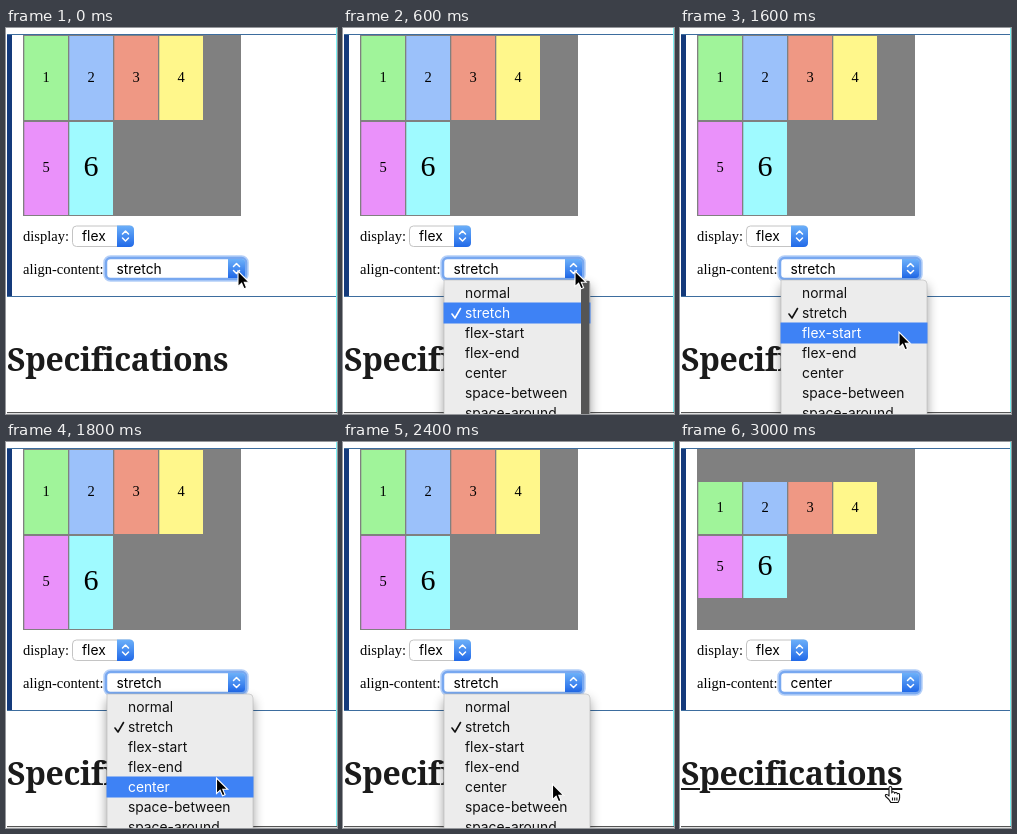
An HTML page for the animation above (3.4 s loop, 331 px wide and 386 px high).

```html
<!DOCTYPE html>
<html lang="en">
<head>
<meta charset="utf-8">
<title>align-content demo</title>
<style>
html, body { margin: 0; width: 100%; height: 100%; overflow: hidden; background: #fff; }
svg { position: absolute; left: 0; top: 0; }
h2 {
  position: absolute; left: 1px; top: 311px; margin: 0; color: #1b1b1b; white-space: nowrap;
  font: 700 32px/40px "Noto Serif", serif; letter-spacing: -.4px;
  text-decoration: none 2px; text-underline-offset: 3px;
}
.serif { font: 14.5px "Liberation Serif", serif; }
.sans { font: 13.8px Inter, sans-serif; }
.mid { text-anchor: middle; }
.big { font-size: 30px; }
</style>
</head>
<body>
<h2 id="title">Specifications</h2>
<svg width="331" height="386" viewBox="0 0 331 386">
  <defs>
    <filter id="blur" x="-30%" y="-30%" width="160%" height="160%"><feGaussianBlur stdDeviation="6"/></filter>
    <linearGradient id="blue" x2="0" y2="1"><stop stop-color="#6cb0f9"/><stop offset="1" stop-color="#2169e8"/></linearGradient>
    <path id="chevrons" d="M-3 -2L0 -5 3 -2M-3 2L0 5 3 2" fill="none" stroke="#fff" stroke-width="1.5" stroke-linecap="round" stroke-linejoin="round"/>
  </defs>

  <path d="M1 6.5H331M1 268.5H331" stroke="#3d6d9e"/>
  <rect x="1" y="7" width="5" height="261" fill="#143a7b"/>
  <rect x="330" width="1" height="386" fill="#7df3f5"/>
  <path d="M1 384.5H331" stroke="#555"/>
  <path d="M1 385.5H331" stroke="#dedede"/>
  <rect x="17" y="7" width="218" height="181" fill="#808080"/>
  <g id="items" class="serif mid"></g>

  <g class="serif">
    <text x="17" y="213">display:</text>
    <text x="17" y="246">align-content:</text>
  </g>

  <rect x="66.5" y="198" width="61" height="20.5" rx="4" fill="#fff" stroke="#c4c4c4"/>
  <path d="M111 197.5H123.5Q128 197.5 128 202V214.5Q128 219 123.5 219H111Z" fill="url(#blue)"/>
  <use href="#chevrons" x="119.5" y="208"/>
  <text class="sans" x="76" y="213">flex</text>

  <rect x="99.5" y="229.5" width="141" height="22" rx="5" fill="#fff" stroke="#b4cff8" stroke-width="4.5"/>
  <rect x="100" y="230" width="140" height="21" rx="4.5" fill="#fff" stroke="#78a8f0" stroke-width="2.5"/>
  <path d="M222 231H236Q239 231 239 234V247Q239 250 236 250H222Z" fill="url(#blue)"/>
  <use href="#chevrons" x="230.5" y="240.5"/>
  <text id="value" class="sans" x="110.5" y="246"></text>

  <g id="menu" class="sans">
    <rect x="101" y="258" width="146" height="140" fill="#000" opacity=".4" filter="url(#blur)"/>
    <path d="M101 252H243Q247 252 247 256V387H101Z" fill="#ececec" stroke="#bbb" stroke-width=".6"/>
    <rect id="mark" x="100.5" width="147" height="21" fill="#3e82f5"/>
    <rect id="strip" x="238" y="253" width="8.5" height="133" fill="#555"/>
    <path id="check" d="M109 286L112 290 117.5 280.5" fill="none" stroke-width="1.6" stroke-linecap="round" stroke-linejoin="round"/>
    <g id="options"></g>
  </g>

  <path id="arrow" d="M0 0V15.6L3.6 12.3 6 17.8 8.6 16.7 6.3 11.3H11.2Z" stroke="#fff" stroke-width="1.1"/>
  <path id="hand" transform="translate(204 344)" fill="#fff" stroke="#111" stroke-width="1.1" stroke-linejoin="round"
    d="M5 10V2Q5 .5 6.4 .5T7.8 2V7Q8 5.6 9.3 5.8T10.6 7.3Q11 6.2 12.2 6.5T13.3 8Q13.8 7.2 14.8 7.6T15.6 9V12Q15.6 14 14 16.5H6.8Q5.5 13.5 2 10.8 .7 9.2 2 8.6 3.5 8.2 5 10ZM8.5 11.5V14.5M10.7 11.5V14.5M12.9 11.5V14.5"/>
</svg>

<script>
const $ = id => document.getElementById(id);
const set = (el, attrs) => { for (const k in attrs) el.setAttribute(k, attrs[k]); };
const add = (parent, tag, attrs, text = "") => {
  const el = document.createElementNS("http://www.w3.org/2000/svg", tag);
  set(el, attrs);
  el.textContent = text;
  return parent.appendChild(el);
};
const show = (id, on) => set($(id), { visibility: on ? "visible" : "hidden" });

const LOOP = 3400;
const colors = ["#a0f49a", "#9bc1fa", "#ef9884", "#fff78b", "#ea91fa", "#9ffaff"];
const items = colors.map((fill, i) => ({
  row: i < 4 ? 0 : 1,
  x: 18.3 + (i % 4) * 45,
  big: i == 5,
  box: add($("items"), "rect", { fill, width: 43.7 }),
  label: add($("items"), "text", { class: i == 5 ? "big" : "" }, i + 1)
}));
const options = ["normal", "stretch", "flex-start", "flex-end", "center", "space-between", "space-around"]
  .map((name, i) => add($("options"), "text", { x: 122, y: 270 + 20 * i }, name));

// Pointer positions: time, x, y
const path = [[1300, 232, 243], [1400, 229, 262], [1500, 224, 284], [1600, 219, 304],
  [1700, 215, 322], [1800, 210.5, 336], [1900, 209.5, 342]];

function layout(centered) {
  const rows = centered ? [[40, 52], [94, 62]] : [[8, 84], [94, 93]];
  for (const { row, x, big, box, label } of items) {
    const [y, height] = rows[row];
    set(box, { x, y, height });
    set(label, { x: x + 21.7, y: Math.floor(y + height / 2 + (big ? 8 : 4)) });
  }
}

function draw(now) {
  const t = Math.floor(now % LOOP / 100) * 100;
  const done = t >= 2600;
  const [, px, py] = path.findLast(p => p[0] <= t) || path[0];
  const picked = t == 2400 ? -1 : Math.max(1, Math.floor((py - 255) / 20));

  layout(done);
  $("value").textContent = done ? "center" : "stretch";

  show("menu", t >= 600 && t < 2700);
  set($("menu"), { opacity: t < 2500 ? 1 : t < 2600 ? .65 : .25 });
  set($("mark"), { y: 254.5 + 20 * picked, opacity: picked < 0 ? 0 : 1 });
  set($("strip"), { opacity: t < 700 ? 1 : 0 });
  set($("check"), { stroke: picked == 1 ? "#fff" : "#111" });
  options.forEach((el, i) => set(el, { fill: i == picked ? "#fff" : "#111" }));

  const over = t >= 2700;
  show("arrow", !over);
  show("hand", over);
  set($("arrow"), { transform: `translate(${px} ${py})` });
  $("title").style.textDecorationLine = over ? "underline" : "none";
}

const start = performance.now();
function tick() {
  draw(performance.now() - start);
  requestAnimationFrame(tick);
}
tick();
</script>
</body>
</html>
```
